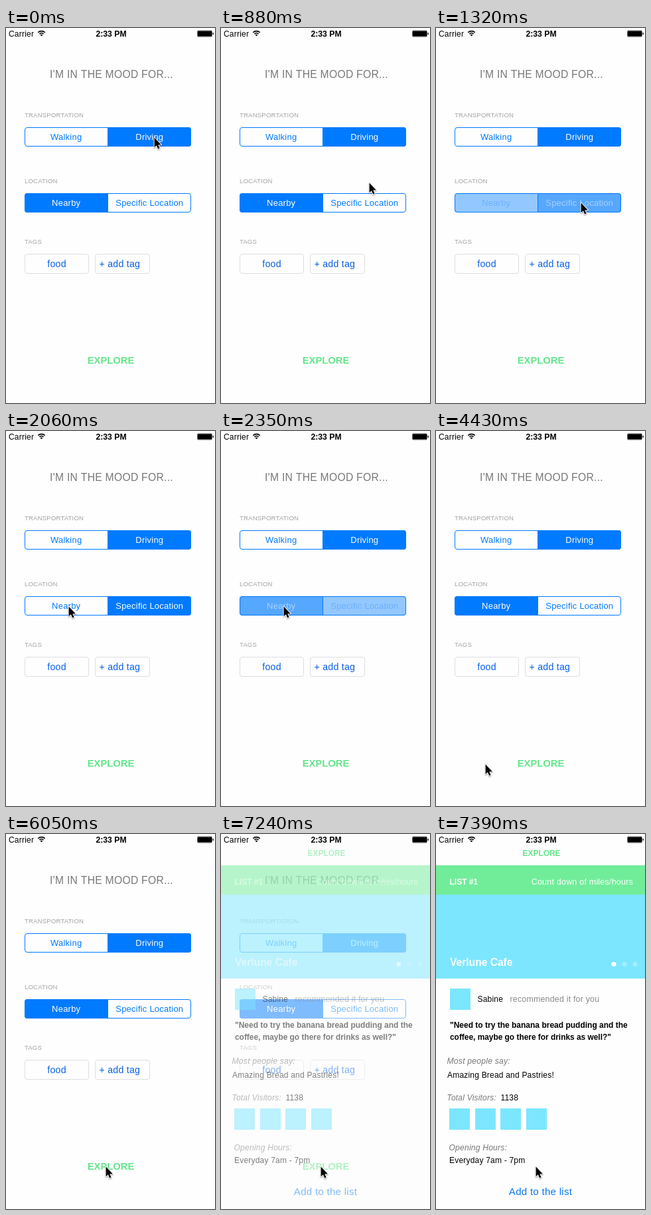
Write an HTML page with a canvas that moves like this. It is 315 by 563 pixels and loops after 8 s.

```html
<!DOCTYPE html>
<html lang="en">
<head>
<meta charset="utf-8">
<title>Mood picker</title>
<style>
html, body { margin: 0; width: 100%; height: 100%; overflow: hidden; background: #fefefe; }
canvas { display: block; width: 315px; height: 563px; }
</style>
</head>
<body>
<canvas id="stage"></canvas>
<script>
const W = 315, H = 563, LOOP = 8000;
const BLUE = '#007aff', LINK = '#0a60e6', GREEN = '#66e58c', SKY = '#7ce6ff', PAPER = '#fefefe';
const canvas = document.getElementById('stage');
const ratio = window.devicePixelRatio || 1;
canvas.width = W * ratio;
canvas.height = H * ratio;
const ctx = canvas.getContext('2d');
ctx.scale(ratio, ratio);

// Pointer position from each moment on: [ms, x, y]
const pointer = [
  [0, 223, 164], [440, 224, 172], [590, 226, 200], [740, 223, 232], [890, 220, 252], [1040, 218, 262],
  [1620, 205, 256], [1770, 165, 243], [1920, 118, 248], [2060, 94, 263],
  [3240, 58, 265], [3390, 22, 330], [3540, 12, 420], [3690, 45, 489],
  [4140, 50, 490], [4290, 60, 494], [4430, 74, 500], [4580, 92, 504], [4730, 108, 505], [4870, 121, 505],
  [5310, 110, 478], [5460, 100, 440], [5610, 103, 411], [5750, 122, 425], [5900, 142, 470], [6050, 150, 499]
];

// Fill of the two location segments: [ms, left, right]
const location2 = [
  [0, 1, 0], [1190, 1, .15], [1320, .42, .66], [1470, 0, 1],
  [2210, .15, 1], [2350, .66, .42], [2500, 1, 0]
];

// Opacity of the detail screen: [ms, alpha]
const detail = [[0, 0], [7240, .5], [7390, 1]];

function at(steps, t) {
  let found = steps[0];
  for (const s of steps) if (s[0] <= t) found = s;
  return found.slice(1);
}

function mix(k) {
  return `rgb(${Math.round(254 * k)},${Math.round(122 + 132 * k)},255)`;
}

function text(str, x, y, size, color, { style = '', align = 'left' } = {}) {
  ctx.font = `${style} ${size}px "Liberation Sans", Arial, sans-serif`;
  ctx.letterSpacing = (style === 'bold' ? 0 : size * .017) + 'px';
  ctx.textAlign = align;
  ctx.fillStyle = color;
  ctx.fillText(str, x, y);
}

function rect(x, y, w, h, color) {
  ctx.fillStyle = color;
  ctx.fillRect(x, y, w, h);
}

function disc(x, y, r, color) {
  ctx.fillStyle = color;
  ctx.beginPath();
  ctx.arc(x, y, r, 0, Math.PI * 2);
  ctx.fill();
}

function roundBox(x, y, w, h, r) {
  ctx.beginPath();
  ctx.roundRect(x, y, w, h, r);
}

function outline(x, y, w, h, r, color) {
  roundBox(x + .5, y + .5, w - 1, h - 1, r);
  ctx.strokeStyle = color;
  ctx.lineWidth = 1;
  ctx.stroke();
}

function segments(y, names, fills) {
  ctx.save();
  roundBox(28, y, 251, 29, 4);
  ctx.clip();
  rect(28, y, 126, 29, mix(1 - fills[0]));
  rect(154, y, 125, 29, mix(1 - fills[1]));
  ctx.restore();
  rect(153, y, 1, 29, BLUE);
  outline(28, y, 251, 29, 3.5, BLUE);
  names.forEach((name, i) =>
    text(name, i ? 216.3 : 90.7, y + 19, 13, mix(fills[i]), { align: 'center' }));
}

function statusBar() {
  text('Carrier', 4, 13, 12, '#000');
  text('2:33 PM', 158.5, 13, 12.2, '#000', { style: 'bold', align: 'center' });
  ctx.strokeStyle = '#000';
  ctx.lineWidth = 1.7;
  for (const r of [4.3, 7.4]) {
    ctx.beginPath();
    ctx.arc(53.5, 12, r, Math.PI * 1.25, Math.PI * 1.75);
    ctx.stroke();
  }
  ctx.beginPath();
  ctx.moveTo(53.5, 12.3);
  ctx.arc(53.5, 12, 2.4, Math.PI * 1.22, Math.PI * 1.78);
  ctx.fillStyle = '#000';
  ctx.fill();
  outline(288, 3.5, 23, 10, 1.5, '#666');
  rect(289, 4.5, 21, 8, '#000');
  rect(311.5, 7, 1.5, 3, '#333');
}

function moodScreen(t) {
  rect(0, 0, W, H, PAPER);
  text("I'M IN THE MOOD FOR...", 159, 75, 15.7, '#777', { align: 'center' });
  text('TRANSPORTATION', 28, 134, 9.6, '#a2a2a2');
  segments(149, ['Walking', 'Driving'], [0, 1]);
  text('LOCATION', 28, 233, 9.6, '#a2a2a2');
  segments(248, ['Nearby', 'Specific Location'], at(location2, t));
  text('TAGS', 28, 324, 9.6, '#a2a2a2');
  outline(28, 339, 97, 30, 3.5, '#dedede');
  outline(134, 339, 83, 30, 3.5, '#dedede');
  text('food', 76.5, 359, 14.2, LINK, { align: 'center' });
  text('+ add tag', 140.5, 359, 14.2, LINK);
  text('EXPLORE', 158, 504, 14.8, GREEN, { style: 'bold', align: 'center' });
}

function detailScreen() {
  const bold = { style: 'bold' }, italic = { style: 'italic' };
  rect(0, 0, W, H, PAPER);
  text('EXPLORE', 159, 33, 11.9, GREEN, { style: 'bold', align: 'center' });
  rect(0, 47, W, 44, '#71ed9a');
  text('LIST #1', 20.5, 76, 12, '#fff', bold);
  text('Count down of miles/hours', 297, 76, 12.5, '#fff', { align: 'right' });
  rect(0, 91, W, 126, SKY);
  text('Verlune Cafe', 21, 198, 15.6, '#fff', bold);
  for (let i = 0; i < 3; i++) disc(268 + i * 16, 195.5, 3.6, i ? 'rgba(255,255,255,.3)' : '#fff');

  rect(21, 232, 31, 32, SKY);
  text('Sabine', 62.5, 252, 12, '#000');
  text('recommended it for you', 111.5, 252, 12.4, '#888');
  text('"Need to try the banana bread pudding and the', 21, 291, 12, '#000', bold);
  text('coffee, maybe go there for drinks as well?"', 21, 308.5, 11.9, '#000', bold);
  text('Most people say:', 16.5, 345, 12.2, '#777', italic);
  text('Amazing Bread and Pastries!', 17, 366, 12, '#000');
  text('Total Visitors:', 16.5, 400, 12, '#777', italic);
  text('1138', 97.5, 400, 12, '#000');
  for (let i = 0; i < 4; i++) rect(20 + Math.round(i * 38.6), 412, 31, 32, SKY);
  text('Opening Hours:', 19.5, 475, 12.1, '#777', italic);
  text('Everyday 7am - 7pm', 20, 494, 12, '#000');
  text('Add to the list', 157.5, 542, 15.1, '#0a78ee', { align: 'center' });
}

function arrow(x, y) {
  ctx.save();
  ctx.translate(x + .6, y + .6);
  ctx.beginPath();
  [[0, 0], [0, 14.6], [3.3, 11.6], [5.6, 17], [8, 16], [5.7, 10.8], [10.3, 10.6]]
    .forEach(p => ctx.lineTo(...p));
  ctx.closePath();
  ctx.lineJoin = 'round';
  ctx.strokeStyle = '#fff';
  ctx.lineWidth = 2;
  ctx.shadowColor = 'rgba(0,0,0,.4)';
  ctx.shadowBlur = 1.5 * ratio;
  ctx.shadowOffsetY = ratio;
  ctx.stroke();
  ctx.shadowColor = 'transparent';
  ctx.fillStyle = '#000';
  ctx.fill();
  ctx.restore();
}

function draw(t) {
  const [alpha] = at(detail, t);
  moodScreen(t);
  if (alpha) {
    ctx.globalAlpha = alpha;
    detailScreen();
    ctx.globalAlpha = 1;
  }
  statusBar();
  arrow(...at(pointer, t));
}

const start = performance.now();
function tick(now) {
  draw(Math.max(0, now - start) % LOOP);
  requestAnimationFrame(tick);
}
tick(start);
</script>
</body>
</html>
```
